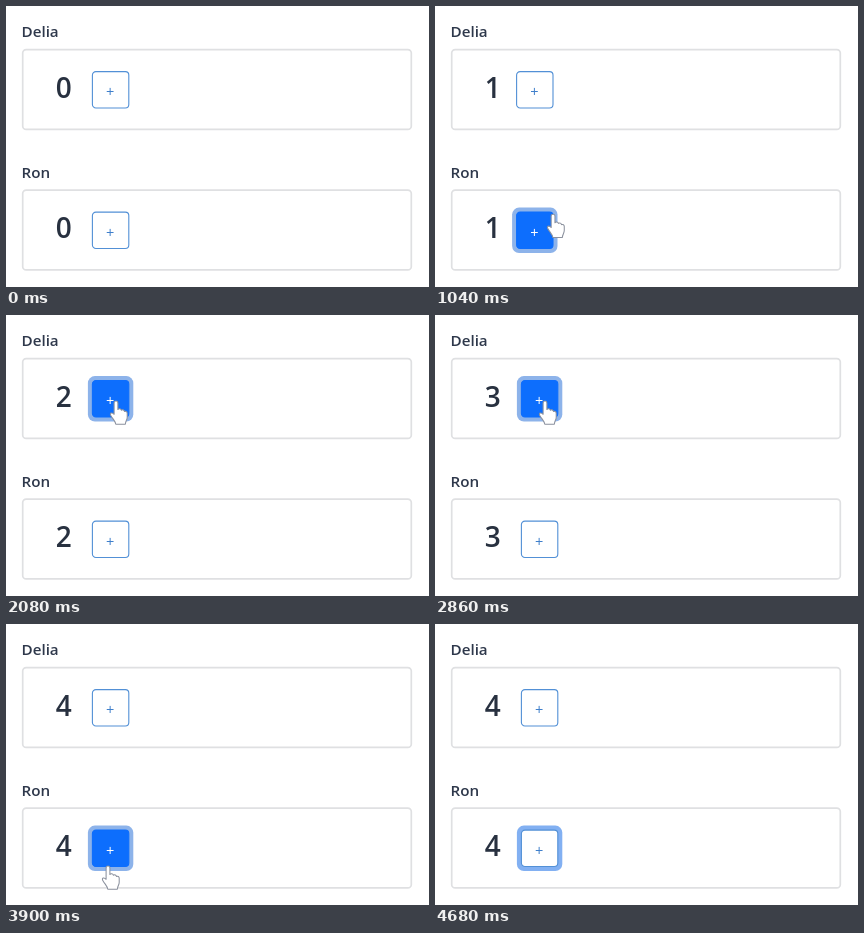
These frames come from a looping animation (423x281 px, 5070 ms). An HTML page:

```html
<!DOCTYPE html>
<html lang="en">
<head>
<meta charset="utf-8">
<title>Shared counters</title>
<style>
  html, body { margin: 0; width: 100%; height: 100%; overflow: hidden; background: #fff; }
  svg { display: block; width: 423px; height: 281px; font-family: "Open Sans", "Noto Sans", sans-serif; }
  .name { font-size: 15.2px; font-weight: 600; fill: #2e384b; }
  .count { font-size: 28px; font-weight: 600; fill: #283140; }
  .card { fill: #fff; stroke: #dfe0e2; stroke-width: 1.7; }
  .ring { fill: #82b0f2; }
  .face { fill: #fff; stroke: #5290d6; stroke-width: 1.1; }
  .plus { font-size: 14.5px; text-anchor: middle; fill: #3f7fcb; }
  .hover .face { fill: #0d6efd; stroke: #0d6efd; }
  .hover .plus { fill: #fff; }
  .hover .ring { fill: #8db3ea; }
  #cursor path { fill: #fff; stroke: #8a909d; stroke-width: 1.1; stroke-linejoin: round; }
</style>
</head>
<body>
<svg viewBox="0 0 423 281">
  <g id="panels"></g>
  <g id="cursor">
    <path id="arrow" d="M0 0V18.5L4.3 14.6 7.2 20.8 10 19.5 7.2 13.4H13.3Z"/>
    <path id="hand" d="M-2 2C-2 -.6 2 -.6 2 2V9C3 7.6 5.4 8 5.6 9.7 7 8.8 8.7 9.4 8.9 11 10.4 10.4 11.8 11.2 11.8 13V17C11.8 20 10 21 9.8 24.5H-.2C-.5 21.5 -3 19.5 -5.5 15.2 -6.9 12.7 -4.3 11.4 -2 14Z"/>
  </g>
</svg>
<script>
const STEP = 130, LOOP = 5070;
const NAMES = ['Delia', 'Ron'];
const ROW_GAP = 140.5, BUTTON_Y = 65.3, BUTTON_SIZE = 37;

const CLICKS = [
  { step: 6, panel: 1 }, { step: 16, panel: 0 },
  { step: 20, panel: 0 }, { step: 28, panel: 1 }
];

// Places the pointer visits, with the steps at which it arrives and leaves.
const STOPS = [
  { arrive: 3, x: 103, y: 236 },
  { arrive: 4, leave: 7, x: 104, y: 226 },
  { arrive: 11, x: 194, y: 112 },
  { arrive: 13, x: 127, y: 82 },
  { arrive: 14, leave: 22, x: 110, y: 86 },
  { arrive: 24, x: 122, y: 150 },
  { arrive: 26, x: 114.5, y: 221 },
  { arrive: 30, x: 102, y: 242 },
  { arrive: 31, x: 100, y: 264 }
];

const $ = id => document.getElementById(id);
const show = (node, visible) => node.style.display = visible ? '' : 'none';
const mix = (a, b, k) => a + (b - a) * k;
const ease = k => k * k * (3 - 2 * k);

$('panels').innerHTML = NAMES.map((name, i) => `
  <g class="panel" transform="translate(0 ${i * ROW_GAP})">
    <text class="name" x="15.5" y="31.3">${name}</text>
    <rect class="card" x="16.7" y="43.6" width="388.6" height="79.8" rx="3.5"/>
    <text class="count" x="49.7" y="91.5"></text>
    <g class="button">
      <rect class="ring" x="-4.2" y="-4.2" width="45.4" height="45.4" rx="7"/>
      <rect class="face" x=".3" y=".3" width="36.4" height="36.4" rx="3.5"/>
      <text class="plus" x="18.1" y="25.8">+</text>
    </g>
  </g>`).join('');

const panels = [...document.querySelectorAll('.panel')].map(panel => ({
  count: panel.querySelector('.count'),
  button: panel.querySelector('.button'),
  ring: panel.querySelector('.ring')
}));

function pointerAt(step) {
  const next = STOPS.findIndex(stop => (stop.leave ?? stop.arrive) >= step);
  if (next < 0 || step < STOPS[0].arrive) return null;
  const to = STOPS[next];
  if (step >= to.arrive) return to;
  const from = STOPS[next - 1];
  const start = from.leave ?? from.arrive;
  const k = ease((step - start) / (to.arrive - start));
  return { x: mix(from.x, to.x, k), y: mix(from.y, to.y, k) };
}

function draw(time) {
  const step = Math.floor(time % LOOP / STEP);
  const done = CLICKS.filter(click => click.step <= step);
  const count = done.length;
  const focused = done.at(-1)?.panel;
  const pointer = pointerAt(step);
  const left = count === 1 ? 81.3 : 86.1; // the digit 1 is narrower
  let overButton = false;

  panels.forEach((panel, i) => {
    const top = BUTTON_Y + i * ROW_GAP;
    const hover = !!pointer && pointer.x >= left && pointer.x <= left + BUTTON_SIZE
      && pointer.y >= top && pointer.y <= top + BUTTON_SIZE;
    overButton ||= hover;
    panel.count.textContent = count;
    panel.button.setAttribute('transform', `translate(${left} ${BUTTON_Y})`);
    panel.button.classList.toggle('hover', hover);
    show(panel.ring, focused === i);
  });

  show($('cursor'), pointer);
  if (pointer) $('cursor').setAttribute('transform', `translate(${pointer.x} ${pointer.y}) scale(.95)`);
  show($('hand'), overButton);
  show($('arrow'), !overButton);
}

function tick() {
  draw(performance.now());
  requestAnimationFrame(tick);
}
tick();
</script>
</body>
</html>
```
